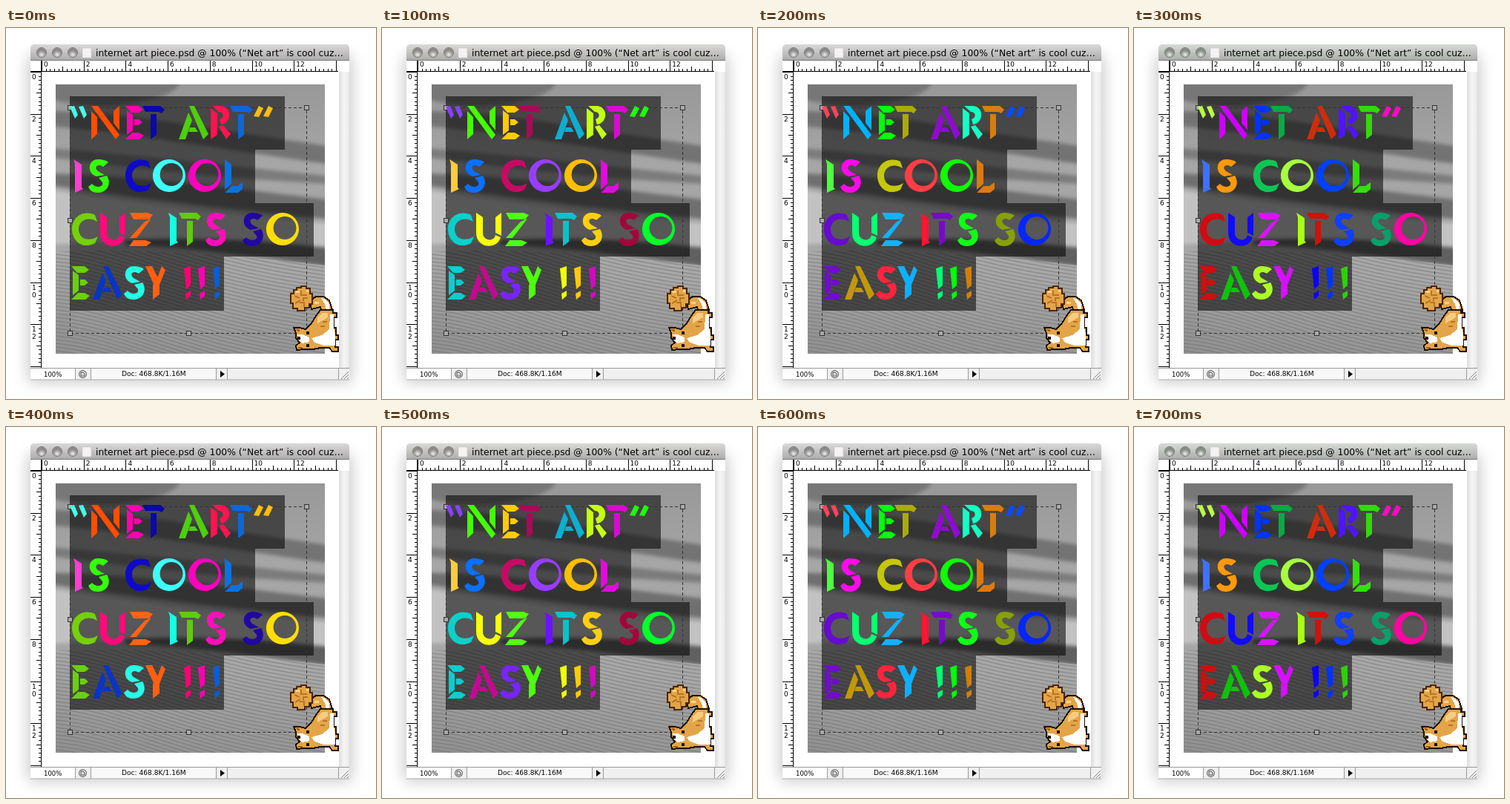
An HTML page for the animation above (0.8 s loop, 499x500 px).

```html
<!DOCTYPE html>
<html lang="en">
<head>
<meta charset="utf-8">
<title>internet art piece</title>
<style>
html, body { margin: 0; width: 100%; height: 100%; overflow: hidden; background: #fff; }
svg { display: block; width: 100vw; height: 100vh; }
text { font-family: "DejaVu Sans", Verdana, sans-serif; }
.crisp { shape-rendering: crispEdges; }
</style>
</head>
<body>
<svg id="stage" viewBox="0 0 499 500" preserveAspectRatio="none">
  <defs>
    <filter id="blur" x="-10%" y="-10%" width="120%" height="120%"><feGaussianBlur stdDeviation="10"/></filter>
    <filter id="soft" x="-10%" y="-50%" width="120%" height="200%"><feGaussianBlur stdDeviation="2.5"/></filter>
    <linearGradient id="bar" x2="0" y2="1"><stop stop-color="#e2e2e2"/><stop offset="1" stop-color="#a9a9a9"/></linearGradient>
    <linearGradient id="sky" x2="0" y2="1"><stop stop-color="#989898"/><stop offset=".3" stop-color="#a6a6a6"/><stop offset="1" stop-color="#a6a6a6"/></linearGradient>
    <linearGradient id="sand" x2="-.3" y2="1"><stop stop-color="#a8a8a8"/><stop offset="1" stop-color="#8e8e8e"/></linearGradient>
    <linearGradient id="track" x2="1" y2="0"><stop stop-color="#ddd"/><stop offset=".5" stop-color="#f6f6f6"/><stop offset="1" stop-color="#e9e9e9"/></linearGradient>
    <radialGradient id="button" cy=".75"><stop stop-color="#fff" stop-opacity=".8"/><stop offset="1" stop-color="#777" stop-opacity=".7"/></radialGradient>
    <clipPath id="photo"><rect x="67" y="76" width="363" height="363"/></clipPath>
    <clipPath id="dune"><path d="M67 302C170 296 290 304 430 320V439H67Z"/></clipPath>
    <clipPath id="canvas"><rect x="48" y="59" width="401" height="399"/></clipPath>
  </defs>

  <rect x="29" y="36" width="438" height="442" rx="6" fill="#000" opacity=".2" filter="url(#blur)"/>

  <path id="title" d="M33 44V28Q33 22 39 22H457Q463 22 463 28V44Z"/>
  <path d="M33 44V28Q33 22 39 22H457Q463 22 463 28V44Z" fill="url(#bar)" opacity=".82"/>
  <path class="crisp" d="M33 43.5H463" stroke="#777"/>
  <g id="lights"></g>
  <rect x="103" y="27" width="12" height="13" fill="#f4f2f2" stroke="#ccc" stroke-width=".7"/>
  <text x="121" y="38" font-size="12.35">internet art piece.psd @ 100% (“Net art” is cool cuz…</text>

  <rect x="33" y="44" width="430" height="430" fill="#fff"/>
  <g id="rulers" class="crisp" stroke="#000"></g>
  <g id="labels" font-size="9"></g>

  <g clip-path="url(#photo)">
    <rect x="67" y="76" width="363" height="363" fill="url(#sky)"/>
    <g filter="url(#soft)">
      <path d="M60 70H236C232 88 205 96 160 103C125 108 95 104 60 96Z" fill="#777"/>
      <path d="M60 112C150 112 250 132 440 160V184C320 168 200 146 60 132Z" fill="#737373"/>
      <path d="M60 162C190 172 320 188 440 200V210C300 204 180 190 60 174Z" fill="#7c7c7c"/>
      <path d="M60 196C180 200 310 216 440 232V258C310 244 190 232 60 212Z" fill="#707070"/>
      <path d="M60 218C190 238 310 252 440 264V298C300 286 180 284 60 292Z" fill="#c2c2c2"/>
      <path d="M160 285C260 280 350 286 440 296V322C340 308 250 296 160 292Z" fill="#606060"/>
    </g>
    <path d="M67 302C170 296 290 304 430 320V439H67Z" fill="url(#sand)"/>
    <g id="ripples" clip-path="url(#dune)" fill="none" stroke="#666" stroke-width="1.4" opacity=".4"></g>
  </g>
  <path class="crisp" d="M86 92H376V164H336V236H415V308H294V381H86Z" fill="#000" opacity=".55"/>
  <rect class="crisp" x="86.5" y="107.5" width="319" height="304" fill="none" stroke="#333" stroke-dasharray="4 3"/>
  <g id="handles" class="crisp" fill="#aaa" stroke="#333"></g>
  <g id="words"></g>

  <g clip-path="url(#canvas)"><g id="cat" class="crisp" stroke-linejoin="round">
    <g id="tail">
      <path d="M409 368L418 362H428L436 367L440 380V386H427L424 376L412 379Z" fill="#e3a548" stroke="#1c1008" stroke-width="2"/>
      <path d="M425 364L431 366L436 372V380H432L430 372Z" fill="#fff"/>
      <path d="M392 350H398V348H405V351H410V358H413V372H409V377H403V381H393V378H387V371H384V358H388V353H392Z" fill="#e3a548" stroke="#4a2508" stroke-width="2"/>
      <path d="M398 354V360H406M389 361L396 364M390 371L397 367M402 376V370H396M407 364H401V368" fill="none" stroke="#b87426" stroke-width="2"/>
      <path d="M391 355H396M405 354H408M416 370H422" fill="none" stroke="#fbd48b" stroke-width="3"/>
    </g>
    <g id="body">
      <path d="M418 388L424 380H441V384H446V390H442V404H445V414H448V420H444V430H448V436H440L436 431H424L414 433H402L392 434L391 428L396 424L391 418V411L388 404H396L404 406L412 398Z" fill="#e3a548" stroke="#1c1008" stroke-width="2"/>
      <path d="M437 386H442V404L444 412V428H428L416 424L412 418L426 414L436 406Z" fill="#fff"/>
      <path d="M393 413H400L409 417V423L400 425L396 422Z" fill="#fff"/>
      <path d="M420 390L426 384H434V390L420 398Z" fill="#f5cd82"/>
      <path d="M405 409H409V413H405ZM405 426H409V430H405ZM393 416H397V420H393Z" fill="#1c1008"/>
      <path d="M391 406H396V409H393ZM394 430H400V432H394Z" fill="#a65f18"/>
      <path d="M427 396H433M424 402H430" stroke="#b87426" stroke-width="2"/>
    </g>
  </g></g>

  <rect x="449" y="59" width="14" height="400" fill="url(#track)"/>
  <rect x="33" y="459" width="430" height="15" fill="#f0f0f0"/>
  <rect x="33" y="459" width="60" height="15" fill="#fff"/>
  <rect x="114" y="459" width="169" height="15" fill="#f8f8f8"/>
  <path class="crisp" d="M33 458.5H463M93.5 459V474M114.5 459V474M283.5 459V474M298.5 459V474M448.5 459V474" fill="none" stroke="#999"/>
  <path d="M33 474H463" stroke="#aaa"/>
  <circle cx="103.5" cy="466.5" r="5" fill="#ddd" stroke="#555"/>
  <path d="M101 469V464H104L106 466V469Z" fill="none" stroke="#555"/>
  <path d="M289 462V471L295 466.5Z"/>
  <path d="M452 473L462 463M456 473L462 467M460 473L462 471" stroke="#888"/>
  <text x="51" y="470" font-size="8.5">100%</text>
  <text x="156" y="469" font-size="9.1">Doc: 468.8K/1.16M</text>
</svg>
<script>
const $ = id => document.getElementById(id);

function add(parent, tag, attrs, text) {
  const node = document.createElementNS("http://www.w3.org/2000/svg", tag);
  for (const key in attrs) node.setAttribute(key, attrs[key]);
  if (text) node.textContent = text;
  return $(parent).appendChild(node);
}

// Folded-ribbon letters, 45 units tall
const glyphs = {
  "“": "M0 1L6 0L11 12L7 17ZM12 1L18 0L23 12L19 17Z",
  "”": "M7 0L13 3L7 15L0 14ZM20 0L26 3L20 15L13 14Z",
  N: "M0 7L8 15V38L0 45ZM0 0H9L38 39L33 45ZM30 7L38 0V33L30 23Z",
  E: "M2 6L10 12V33L2 39ZM0 0H18L24 5L18 9H8ZM12 18H18L23 22L18 26H12ZM0 45L9 36H18L25 40L19 45Z",
  T: "M0 0H24L30 5L26 10L22 8H4ZM11 11H19V39L11 45Z",
  A: "M13 9L18 19L9 45H0ZM14 0H21L40 38L33 45ZM15 29H22L26 35H13Z",
  R: "M0 3L9 10V39L0 45ZM2 0H14C29 1 29 23 14 25L12 18C19 16 18 8 11 8ZM11 28L17 26L27 38L21 45Z",
  I: "M0 0L11 7V38L13 40L2 45V6Z",
  S: "M27 4L20 10C12 5 7 11 13 16L22 21L11 23C-3 18 0 0 13 0C18 0 24 1 27 4ZM25 22C32 33 25 45 13 45C6 45 2 42 0 37L5 33C10 39 21 38 19 31L14 25Z",
  C: "M31 3L34 12C21 4 9 11 9 22C9 35 22 40 35 32L31 41C14 50 0 38 0 22C0 5 16 -4 31 3Z",
  O: "M22 0A22 22 0 1 1 21.9 0ZM25 5A15.5 15.5 0 1 0 25.1 5Z",
  L: "M1 0L10 7V33L1 41ZM1 45L10 36H18L25 31V40L19 45Z",
  U: "M0 0L9 6V27C9 38 24 40 26 30L33 33C29 50 0 49 0 27ZM26 6L34 0V31L26 27Z",
  Z: "M1 0H25L32 3L27 9H6ZM21 12L30 8L10 34H1ZM0 45L6 37H22L30 40L23 45Z",
  Y: "M0 0H9L17 16L11 24ZM17 13L22 0L27 5L19 25V38L10 45V26Z",
  "!": "M0 3L9 0V26L3 31ZM2 37L9 33V40L3 45Z"
};

// Each letter: glyph, left edge, hue, lightness
const lines = [
  [105, "“ 86 172 63,N 115 18 50,E 161 318 50,T 184 240 35,A 233 100 43,R 276 345 54,T 302 213 45,” 334 44 52"],
  [177, "I 91 314 62,S 111 125 52,C 161 241 41,O 198 178 62,O 246 315 50,L 294 211 46"],
  [249, "C 89 88 43,U 127 332 52,Z 166 20 54,I 219 172 54,T 233 93 42,S 269 318 53,S 319 250 33,O 351 52 51"],
  [321, "E 88 91 43,A 117 226 40,S 159 173 57,Y 188 20 53,! 240 333 50,! 259 318 50,! 279 215 43"]
];
const letters = [];
for (const [y, row] of lines) {
  for (const item of row.split(",")) {
    const [char, x, hue, light] = item.split(" ");
    const node = add("words", "path", { d: glyphs[char], transform: `translate(${x} ${y})` });
    letters.push({ node, hue: +hue, light });
  }
}

const lights = [48, 69, 90].map(cx => {
  const disc = add("lights", "circle", { cx, cy: 33, r: 6.5, stroke: "#777", "stroke-width": 1 });
  add("lights", "circle", { cx, cy: 33, r: 6, fill: "url(#button)" });
  return disc;
});

// Rulers: ten short ticks per labelled step
let ticks = "M33 58.5H448M47.5 44V459";
for (let i = 0; i <= 70; i++) {
  const step = Math.round(i * 5.67), size = i % 10 === 0 ? 14 : i % 5 === 0 ? 6 : 3;
  ticks += `M${48.5 + step} 58v${-size}`;
  if (step < 400) ticks += `M47 ${59.5 + step}h${-size}`;
}
add("rulers", "path", { d: ticks, fill: "none" });
for (let i = 0; i < 7; i++) {
  const at = i * 56.7, label = String(i * 2);
  add("labels", "text", { x: 51 + at, y: 52 }, label);
  [...label].forEach((digit, n) => add("labels", "text", { x: 35, y: 69 + at + n * 10 }, digit));
}

for (let y = 190; y < 450; y += 5) {
  add("ripples", "path", { d: `M67 ${y}C160 ${y + 8} 240 ${y + 64} 430 ${y + 88}` });
}
for (const [x, y] of [[86, 107], [405, 107], [86, 259], [86, 411], [246, 411]]) {
  add("handles", "rect", { x: x - 2.5, y: y - 2.5, width: 6, height: 6 });
}

const tints = ["#b9b0b4", "#b8b5ae", "#b3b3b3", "#aab8a6"];
const tailShift = [0, 1, 0, 3, 0, 1, 0, 2];
const bodyShift = [0, -1, -2, 0];

// Greens lean towards yellow, dark inks are a little duller
function ink(hue, light) {
  const lean = 20 * Math.max(0, 1 - Math.abs(hue - 132) / 30);
  return `hsl(${hue - lean},${light < 50 ? 90 : 100}%,${light}%)`;
}

function draw(now) {
  const beat = Math.floor(now % 800 / 100), phase = beat % 4;
  for (const { node, hue, light } of letters) {
    node.setAttribute("fill", ink((hue + phase * 90) % 360, light));
  }
  for (const node of [$("title"), ...lights]) node.setAttribute("fill", tints[phase]);
  $("tail").setAttribute("transform", `translate(${tailShift[beat]} 0)`);
  $("body").setAttribute("transform", `translate(${bodyShift[phase]} 0)`);
}

const start = performance.now();
function loop() {
  draw(performance.now() - start);
  requestAnimationFrame(loop);
}
loop();
</script>
</body>
</html>
```
